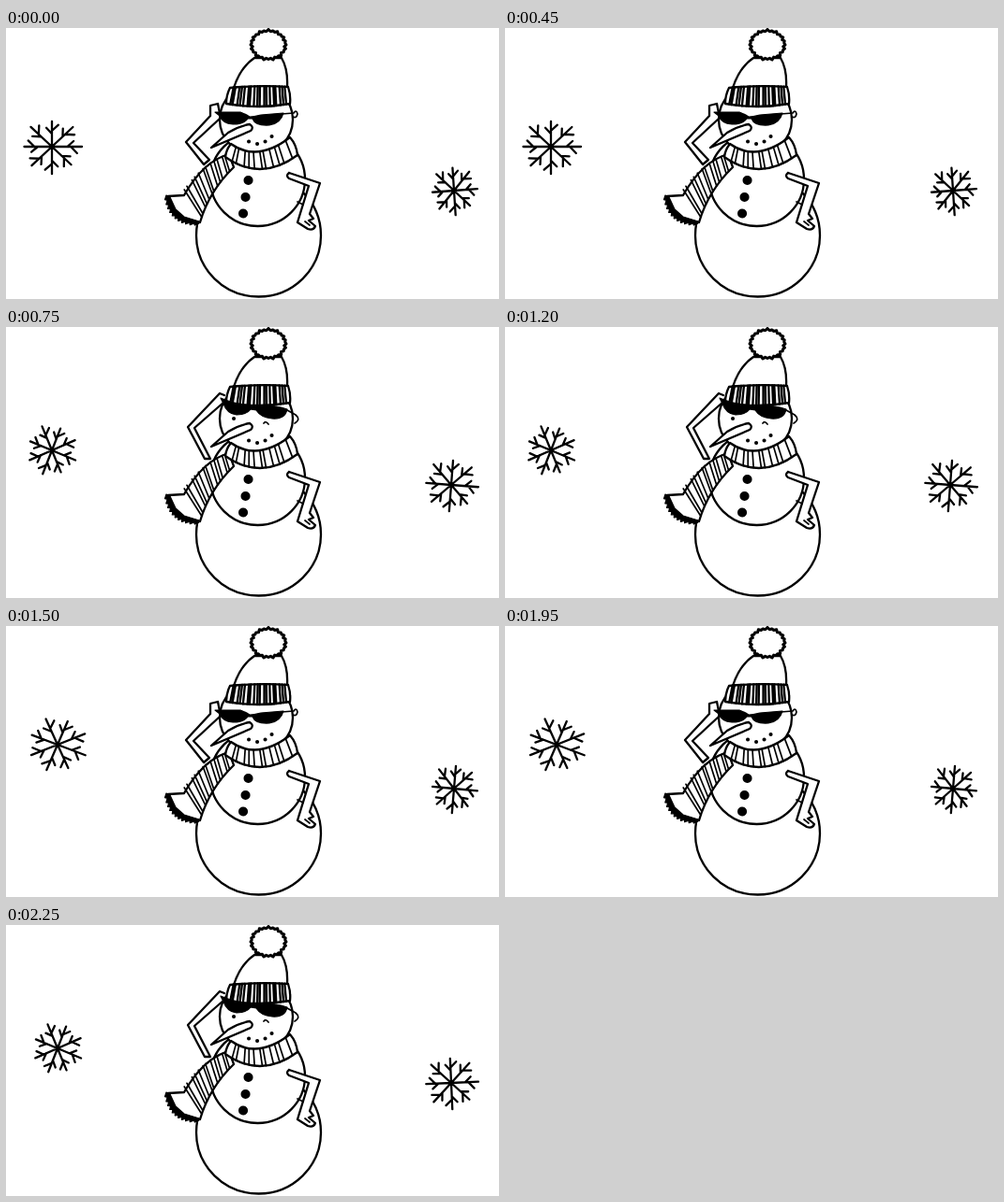
These frames come from a looping animation (526 by 290 pixels, 3 s). An HTML page:

```html
<!DOCTYPE html>
<html lang="en">
<head>
<meta charset="utf-8">
<title>Cool snowman</title>
<style>
  html, body { margin: 0; width: 100%; height: 100%; overflow: hidden; background: #fff; }
  svg { display: block; width: 100vw; height: 100vh; }
  path, ellipse { fill: none; stroke: #000; stroke-width: 2.3; stroke-linecap: round; stroke-linejoin: round; }
  ellipse, .white { fill: #fff; }
  .black { fill: #000; stroke-width: 1.2; }
  .thin { stroke-width: 1.7; }
</style>
</head>
<body>
<svg viewBox="0 0 526 290">
  <!-- body, buttons, right arm -->
  <ellipse cx="269.5" cy="222" rx="66.5" ry="65.5"/>
  <ellipse cx="268.5" cy="162" rx="50.5" ry="50"/>
  <path d="M258.5 163h.1M255.500 181h.1M253 198.500h.1" style="stroke-width:10"/>
  <path class="white" d="M302 155L335 166L324 199L328 204L323 206L330 212Q328 217 322 215L311 208L323 169L302 161Q298 158 302 155"/>
  <path class="thin" d="M311 186L317 189M319 207L324 211"/>

  <!-- left arm: glasses on, glasses lifted -->
  <path class="pose white" d="M228 97L200 123L217 141L211 146L192 122L218 94L218 83L226 81L228 91"/>
  <path class="pose white" d="M233 80L201 108L218 141L212 141L194 107L228 71L233 73"/>

  <!-- scarf tail -->
  <path class="white" d="M238 135Q211 142 190 179L173 180L181 201L207 208Q217 174 243 149Z"/>
  <path class="thin" id="tail"/>
  <path class="black" id="fringe"/>

  <!-- head and hat -->
  <ellipse cx="267" cy="98" rx="39" ry="38"/>
  <path class="white" d="M243 64Q250 42 265 32H294Q301 44 300 63Z"/>
  <path class="white" d="M239 64Q270 61 301 63Q304 72 303 81Q270 87 235 81Q235 72 239 64Z"/>
  <path id="band"/>
  <path class="white" id="pompom" style="stroke-width:3"/>

  <!-- glasses on -->
  <g class="pose">
    <path class="black" d="M223 90L250 90Q255 92 260 95Q264 95 272 93L296 91Q293 102 281 104Q266 105 263 97L258 97Q254 103 242 103Q231 102 228 94Z"/>
    <path class="thin" d="M294 92L307 91Q310 87 311 92Q310 97 306 95"/>
  </g>
  <!-- glasses lifted -->
  <g class="pose">
    <path class="black" d="M229 76Q245 83 263 84Q285 83 300 88Q298 99 284 98Q272 97 267 89L261 88Q257 94 246 94Q236 93 232 82Z"/>
    <path class="thin" d="M300 89L309 94Q315 99 308 103M275 103Q277 100 280 104"/>
    <path d="M243 98h.1" style="stroke-width:4"/>
  </g>

  <path class="white" d="M219 128L237 112Q248 105 260 103Q265 106 261 110Z"/>
  <path d="M259 121.500h.1M268 124h.1M276.500 121.500h.1M283.500 116h.1" style="stroke-width:4"/>

  <!-- scarf collar -->
  <path class="white" d="M240 124Q268 144 303 117Q310 125 311 136Q272 165 234 138Q235 130 240 124Z"/>
  <path class="thin" id="collar"/>
  <path id="leftFlake"/>
  <path id="rightFlake"/>
</svg>
<script>
const draw = (id, d) => document.getElementById(id).setAttribute('d', d);
const line = (...points) => 'M' + points.join('L');
const polar = (cx, cy, rx, ry, a) => [cx + rx * Math.cos(a), cy + ry * Math.sin(a)];

// point on a quadratic curve [x0, y0, cx, cy, x1, y1]
const onCurve = (c, t) => [0, 1].map(i =>
  (1 - t) ** 2 * c[i] + 2 * t * (1 - t) * c[i + 2] + t * t * c[i + 4]);

// slightly uneven stripes joining two curves
function hatch(id, a, b, count) {
  let d = '';
  for (let i = 1; i < count; i++) {
    const t = (i + 0.2 * Math.sin(i * 2.4)) / count;
    d += line(onCurve(a, t), onCurve(b, t));
  }
  draw(id, d);
}

hatch('band', [239, 64, 270, 61, 301, 63], [235, 81, 270, 87, 303, 81], 19);
hatch('collar', [240, 124, 268, 144, 303, 117], [234, 138, 272, 165, 311, 136], 12);
hatch('tail', [238, 135, 211, 142, 186, 179], [243, 149, 217, 174, 207, 208], 13);

const wool = [], fringe = [[175, 181], [181, 194], [190, 202], [206, 207]];
for (let i = 0; i < 48; i++) {
  const bump = i % 2 * 1.6 + 0.5 * Math.sin(i * 1.7);
  wool.push(polar(280, 18, 19 - bump, 16 - bump, i * Math.PI / 24));
}
for (let i = 0; i <= 22; i++) {
  const [x, y] = onCurve([205, 210, 175, 211, 170, 180], i / 22), out = i % 2 * 2 - 1;
  fringe.push([x - out, y + out]);
}
draw('pompom', line(...wool) + 'Z');
draw('fringe', line(...fringe) + 'Z');

// eight arms, each with two staggered twigs
function flake(id, cx, cy, rx, ry, degrees) {
  let d = '';
  for (let i = 0; i < 8; i++) {
    const a = degrees * Math.PI / 180 + i * Math.PI / 4;
    const at = (r, turn = 0) => polar(cx, cy, rx * r, ry * r, a + turn);
    const reach = 0.95 + 0.05 * Math.cos(i * 2.6);
    d += line([cx, cy], at(reach));
    for (const side of [-1, 1]) {
      const root = reach * (0.57 + 0.06 * side);
      d += line(at(root), at(root + 0.24, side * 0.27));
    }
  }
  draw(id, d);
}

const poses = document.querySelectorAll('.pose');
let shown = -1;
function tick() {
  const step = Math.floor(performance.now() % 3000 / 750);
  if (step !== shown) {
    shown = step;
    const lifted = step % 2;
    poses.forEach((pose, i) => pose.style.display = i % 2 === lifted ? '' : 'none');
    // the flakes swing round and take turns growing
    flake('leftFlake', step < 2 ? 49 : 55, 127 + 5 * lifted, 32 - 5 * lifted, 30 - 2 * lifted, step ? 22 : 0);
    flake('rightFlake', 478 - 3 * lifted, 174 - 5 * lifted, 25 + 4 * lifted, 27 + 2 * lifted, 10 * Math.sin(step) - 4);
  }
  requestAnimationFrame(tick);
}
tick();
</script>
</body>
</html>
```
